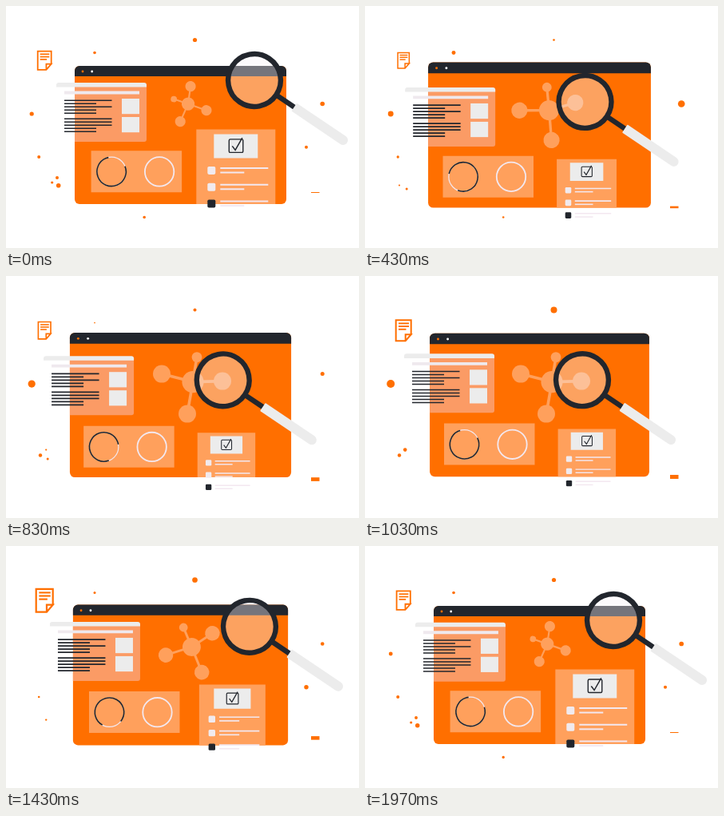
An HTML page with a canvas for the animation above (2.01 s loop, 442 px wide and 303 px high).

```html
<!DOCTYPE html>
<html lang="en">
<head>
<meta charset="utf-8">
<title>Research dashboard</title>
<style>
  html, body { margin: 0; width: 100%; height: 100%; overflow: hidden; background: #fff; }
  canvas { display: block; width: 442px; height: 303px; }
</style>
</head>
<body>
<canvas id="stage"></canvas>
<script>
const canvas = document.getElementById('stage');
const ctx = canvas.getContext('2d');
const ratio = window.devicePixelRatio || 1;
canvas.width = 442 * ratio;
canvas.height = 303 * ratio;

const LOOP = 2010, TICKS = 60;
const KEYS = [0, 7, 19, 31, 37, 49];
const ORANGE = '#ff6f00', DARK = '#22262d', PALE = '#ffa05c';
const LIGHT = '#ececec', LILAC = '#f3e8f0';
const RAD = Math.PI / 180;

// Monotone cubic through six poses; `turn` is the total gained per loop.
function track(v, turn = 0) {
  const n = KEYS.length;
  const time = i => KEYS[(i + n) % n] + Math.floor(i / n) * TICKS;
  const val = i => v[(i + n) % n] + Math.floor(i / n) * turn;
  const slope = i => (val(i + 1) - val(i)) / (time(i + 1) - time(i));
  const tangent = i => {
    const a = slope((i + n) % n - 1), b = slope((i + n) % n);
    return a * b <= 0 ? 0 : 2 * a * b / (a + b);
  };
  return t => {
    let i = n - 1;
    while (KEYS[i] > t) i--;
    const h = time(i + 1) - time(i), u = (t - time(i)) / h, w = 1 - u;
    return val(i) * w * w * (1 + 2 * u) + val(i + 1) * u * u * (3 - 2 * u)
      + h * u * w * (tangent(i) * w - tangent(i + 1) * u);
  };
}

const panel = { x: track([63, 57, 46, 49, 51, 59]), y: track([96, 101, 102.3, 97.3, 96.2, 94.2]) };
const rings = {
  x: track([106.6, 100.3, 96.2, 99, 101.4, 105.8]),
  y: track([181.2, 184, 190, 184.6, 183.2, 181.3]),
  gap: track([-62, -170, -246, -427, -500, -751], -720)
};
const card = {
  x: track([238.3, 241.6, 238.6, 241.6, 243.2, 240]),
  y: track([154.4, 178, 198.6, 191.4, 184, 164]),
  s: track([1, .813, .732, .732, .763, .919])
};
const graph = {
  x: track([228, 227, 234, 234, 233.5, 231]),
  y: track([122.6, 127, 132.6, 132.6, 130.4, 123.4]),
  s: track([.6, .78, 1, 1, .97, .7]),
  a: track([-80.5, -42, 0, 0, -9.5, -56])
};
const lens = {
  x: track([311, 284.5, 271.6, 272, 292.5, 311]),
  y: track([93, 104, 130.4, 130.2, 115, 93])
};
const page = track([25, 23, 20, 28, 32, 29]);
const dash = { y: track([233.5, 244.3, 256, 251.5, 246.3, 236]), h: track([1, 1.3, 4, 5, 5, 3.6]) };
const dots = [
  [236.5, 42.5, [2.6, 2.7, 0, 4, 3.7, 3]],
  [111, 58.5, [1.8, 2.7, 2, 0, 0, 3]],
  [32.2, 135, [2.6, 3, 4, 5, 0, 0]],
  [41.2, 189, [2, 3.3, 0, 0, 0, 2.6]],
  [64, 215, [2, 0, 0, 0, 0, 0]],
  [57.7, 221, [1.6, 0, 0, 0, 0, 0]],
  [65.7, 224.7, [2.8, 0, 0, 0, 0, 0]],
  [43, 224.5, [0, 0, 2.2, 2.2, 0, 0]],
  [52.2, 229, [0, 0, 3, 0, 0, 0]],
  [50.2, 217.6, [0, 0, 0, 2.3, 2.4, 0]],
  [173.2, 264.5, [1.8, 2.6, 0, 0, 0, 0]],
  [396.2, 122.5, [2.8, 3.4, 5, 0, 0, 4.6]],
  [376, 176.8, [2, 0, 0, 0, 3, 2.3]]
].map(([x, y, r]) => ({ x, y, r: track(r) }));

function box(x, y, w, h, fill, r = 0) {
  ctx.fillStyle = fill;
  ctx.beginPath();
  ctx.roundRect(x, y, w, h, r);
  ctx.fill();
}

function disc(x, y, r, fill) {
  ctx.fillStyle = fill;
  ctx.beginPath();
  ctx.arc(x, y, Math.max(0, r), 0, 7);
  ctx.fill();
}

function ring(x, y, r, color, width, from = 0, to = 360) {
  ctx.strokeStyle = color;
  ctx.lineWidth = width;
  ctx.beginPath();
  ctx.arc(x, y, r, from * RAD, to * RAD);
  ctx.stroke();
}

function line(points, color, width, cap = 'butt') {
  ctx.strokeStyle = color;
  ctx.lineWidth = width;
  ctx.lineCap = cap;
  ctx.beginPath();
  points.forEach(([x, y]) => ctx.lineTo(x, y));
  ctx.stroke();
  ctx.lineCap = 'butt';
}

// Runs `draw` in a moved, scaled and turned space.
function place(x, y, s, angle, draw) {
  ctx.save();
  ctx.translate(x, y);
  ctx.scale(s, s);
  ctx.rotate(angle * RAD);
  draw();
  ctx.restore();
}

function windowGrowth(t) {
  const phase = t < 14 ? t / 14 : 1 - (t - 14) / 46;
  return 1 + .053 * (1 - Math.cos(Math.PI * phase)) / 2;
}

function inWindow(s, draw) {
  ctx.save();
  ctx.beginPath();
  ctx.roundRect(218.5 - 132.5 * s, 161.5 - 86.5 * s, 265 * s, 173 * s, 6 * s);
  ctx.clip();
  draw();
  ctx.restore();
}

function drawWindow(s) {
  place(218.5, 161.5, s, 0, () => {
    box(-132.5, -86.5, 265, 173, ORANGE, 6);
    box(-132.5, -86.5, 265, 13, DARK, [6, 6, 0, 0]);
    disc(-122.5, -79.5, 1.4, ORANGE);
    disc(-110.8, -79.5, 1.4, '#fff');
  });
}

function drawPanel(t, s) {
  const x = panel.x(t), y = panel.y(t);
  inWindow(s, () => box(x + 7, y + 2, 106, 72, '#fb9b65', [0, 0, 3, 3]));
  place(x, y, 1, 0, () => {
    box(0, 0, 113, 5.6, LIGHT, [3, 3, 0, 0]);
    box(10, 10.6, 94, 3.8, '#efe9ee');
    for (const [top, longs] of [[22.2, [0, 2]], [45.2, [0, 1, 2]]]) {
      box(82, top - 2.2, 22, 19.2, LIGHT);
      for (let i = 0; i < 5; i++)
        box(10, top + i * 4 - .8, longs.includes(i) ? 59.5 : 40, 1.6, DARK);
    }
  });
}

function drawGraph(t) {
  place(graph.x(t), graph.y(t), graph.s(t), graph.a(t), () => {
    for (const [x, y, r] of [[-39, -10, 11], [-7, 40, 11], [5, -31, 6.4], [37, -1, 11]]) {
      line([[0, 0], [x, y]], PALE, 3.6);
      disc(x, y, r, PALE);
    }
    disc(0, 0, 13.6, PALE);
  });
}

function drawRings(t) {
  place(rings.x(t), rings.y(t), 1, 0, () => {
    const gap = rings.gap(t);
    box(0, 0, 113.5, 52, PALE);
    ring(25.5, 26.2, 18.2, LILAC, 1.2);
    ring(25.5, 26.2, 18.2, DARK, 1.6, gap + 40, gap + 320);
    ring(85.5, 26.2, 18.2, LILAC, 1.8);
  });
}

function drawCard(t, s) {
  const x = card.x(t), y = card.y(t), k = card.s(t);
  inWindow(s, () => box(x, y, 99 * k, 120 * k, PALE));
  place(x, y, k, 0, () => {
    box(22, 6, 55, 30, LIGHT);
    ctx.strokeStyle = DARK;
    ctx.lineWidth = 1.4;
    ctx.beginPath();
    ctx.roundRect(41, 12.5, 17.5, 16.5, 1.5);
    ctx.stroke();
    line([[45, 21], [48.8, 26], [57.5, 10.8]], DARK, 1.5);
    for (let i = 0; i < 3; i++) {
      const top = 46.5 + i * 20.8;
      box(14, top, 10, 10, i < 2 ? '#f1eaee' : DARK, 1.8);
      box(30, top + 1, 60, 2, LILAC);
      box(30, top + 6.6, 30, 2, LILAC);
    }
  });
}

function drawPage(t) {
  place(48.2, 68.2, page(t) / 28, 0, () => {
    line([[9.5, 5], [9.5, -13], [-9.5, -13], [-9.5, 13], [2.5, 13], [9.5, 5], [2.5, 5], [2.5, 13]], ORANGE, 2);
    [13, 13, 9.5].forEach((w, i) => box(-6.2, -9.8 + i * 3.7, w, 1.9, ORANGE));
  });
}

function drawLens(t) {
  place(lens.x(t), lens.y(t), 1, 34, () => {
    disc(0, 0, 32, 'rgba(248,243,248,.39)');
    line([[33, 0], [62, 0]], DARK, 6.4);
    box(60, -6, 80, 12, LIGHT, [1, 6, 6, 1]);
    ring(0, 0, 32.9, DARK, 6.4);
  });
}

function render(now) {
  const t = Math.min(TICKS - 1, Math.floor((now % LOOP + 4) * 3 / 100));
  const s = windowGrowth(t);
  ctx.setTransform(ratio, 0, 0, ratio, 0, 0);
  ctx.fillStyle = '#fff';
  ctx.fillRect(0, 0, 442, 303);
  drawWindow(s);
  drawPanel(t, s);
  drawGraph(t);
  drawRings(t);
  drawCard(t, s);
  drawPage(t);
  for (const d of dots) disc(d.x, d.y, d.r(t), ORANGE);
  box(382, dash.y(t) - dash.h(t) / 2, 10.5, dash.h(t), ORANGE);
  drawLens(t);
}

const start = performance.now();
function loop() {
  render(performance.now() - start);
  requestAnimationFrame(loop);
}
loop();
</script>
</body>
</html>
```
